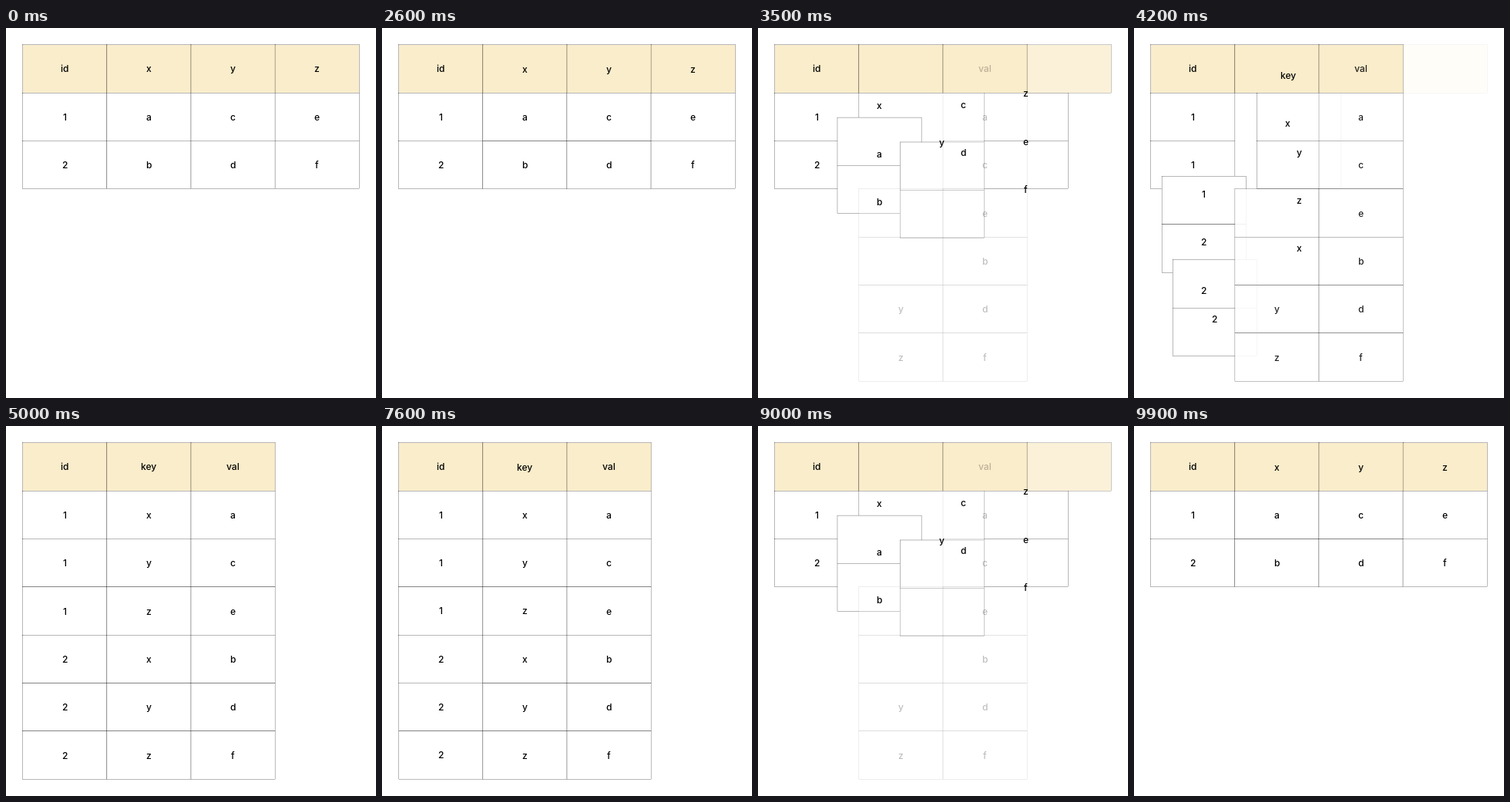
Animation of 480 by 480 pixels, one loop 10 s. Source, as an HTML page:

```html
<!DOCTYPE html>
<html lang="en">
<head>
<meta charset="utf-8">
<title>Wide and long table</title>
<style>
  html, body { margin: 0; width: 100%; height: 100%; overflow: hidden; background: #fff; }
  svg { display: block; width: 100vw; height: 100vh; }
  text { font: 500 12px Inter, sans-serif; }
</style>
</head>
<body>
<svg id="stage" viewBox="0 0 480 480"></svg>
<script>
const STEP = 100, PHASE = 2500, LOOP = 4 * PHASE;
const MARGIN = 480 / 22, SPAN = 480 / 1.1;
const CELL_W = SPAN / 4, CELL_H = SPAN / 7;
const HEAD = '#faedcb', BODY = '#fff', LINE = 0.28;

const wide = cells('id12 xab ycd zef'.split(' ').map(s => [...s].length > 3 ? ['id', '1', '2'] : [...s]));
const long = cells([
  ['id', ...'111222'],
  ['key', ...'xyzxyz'],
  ['val', ...'acebdf']
]);

const stage = document.getElementById('stage');
const pen = document.createElement('canvas').getContext('2d');

// Lists the cells column by column.
function cells(columns) {
  return columns.flatMap((column, col) => column.map((label, row) => ({ col, row, label })));
}

// Pairs two lists by position; the longer list's rest has only one side.
function pair(from, to) {
  const size = Math.max(from.length, to.length);
  return Array.from({ length: size }, (_, i) => ({ from: from[i], to: to[i] }));
}

function add(name, attrs) {
  const el = document.createElementNS('http://www.w3.org/2000/svg', name);
  set(el, attrs);
  return stage.appendChild(el);
}

function set(el, attrs) {
  for (const key in attrs) el.setAttribute(key, attrs[key]);
}

const isHead = cell => cell.row === 0;
const isBody = cell => cell.row > 0;

function makeTiles(test, fill) {
  return pair(wide.filter(test), long.filter(test)).map(move => ({
    ...move,
    fill: add('rect', { fill }),
    edge: add('rect', { fill: 'none', stroke: '#000', 'stroke-width': LINE })
  }));
}

const tiles = [...makeTiles(isHead, HEAD), ...makeTiles(isBody, BODY)];
const labels = pair(wide, long).map(move => ({ ...move, text: add('text', {}) }));

const mix = (a, b, k) => a + (b - a) * k;

// Top left corner and opacity of a moving or fading cell.
function pose({ from, to }, k) {
  const a = from || to, b = to || from;
  return {
    x: MARGIN + mix(a.col, b.col, k) * CELL_W,
    y: MARGIN + mix(a.row, b.row, k) * CELL_H,
    alpha: mix(from ? 1 : 0, to ? 1 : 0, k)
  };
}

// Fills cover whole pixels, edges are antialiased.
function drawTile(tile, k) {
  const { x, y, alpha } = pose(tile, k);
  const snap = v => Math.ceil(v - 0.5);
  const left = snap(x), top = snap(y);
  set(tile.fill, {
    x: left, y: top,
    width: snap(x + CELL_W) - left, height: snap(y + CELL_H) - top,
    'fill-opacity': alpha
  });
  set(tile.edge, { x, y, width: CELL_W, height: CELL_H, 'stroke-opacity': alpha });
}

function drawLabel(item, k) {
  const { x, y, alpha } = pose(item, k);
  const cell = k < 0.5 ? item.from || item.to : item.to || item.from;
  pen.font = '500 12px Inter, sans-serif';
  const size = pen.measureText(cell.label);
  const bearing = Math.round(-size.actualBoundingBoxLeft);
  item.text.textContent = cell.label;
  set(item.text, {
    x: Math.round(x + CELL_W / 2 - Math.round(size.width) / 2 - bearing),
    y: Math.floor(y + CELL_H / 2 + 5 + 1e-6),
    'fill-opacity': alpha
  });
}

const cubic = p => p < 0.5 ? 4 * p ** 3 : 1 - 4 * (1 - p) ** 3;

// Hold wide, move to long, hold long, move back.
function progress(time) {
  const t = Math.floor(time / STEP) * STEP % LOOP;
  const half = 2 * PHASE;
  const k = cubic(Math.max(0, t % half - PHASE) / PHASE);
  return t < half ? k : 1 - k;
}

function render(time) {
  const k = progress(time);
  tiles.forEach(tile => drawTile(tile, k));
  labels.forEach(item => drawLabel(item, k));
}

const start = performance.now();
function tick() {
  render(performance.now() - start);
  requestAnimationFrame(tick);
}
tick();
</script>
</body>
</html>
```
